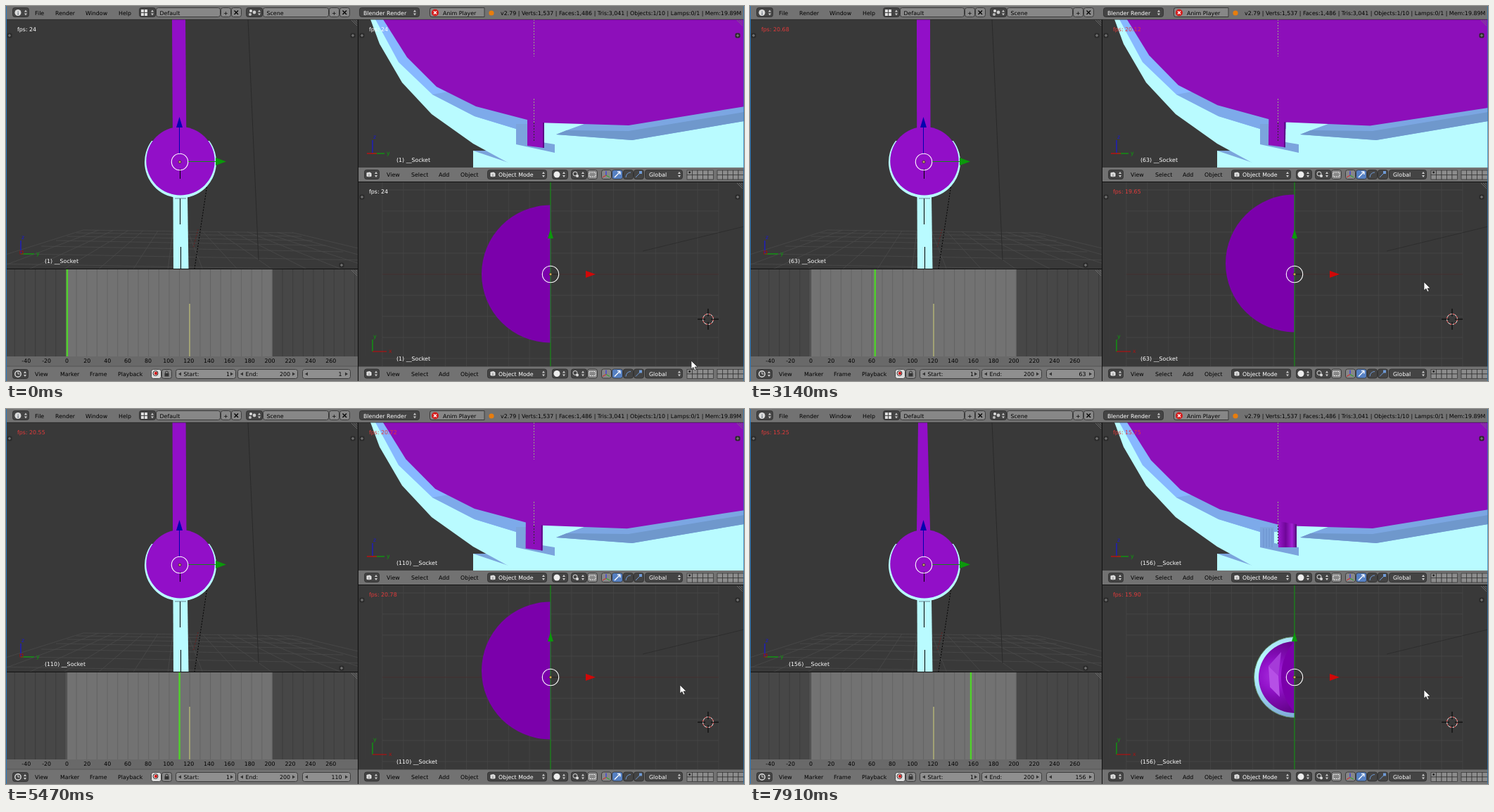
Animation, 1049 px wide and 534 px high, one loop 7990 ms. Source, as an HTML page:

```html
<!DOCTYPE html>
<html lang="en">
<head>
<meta charset="utf-8">
<title>Ball and socket</title>
<style>
html, body { margin: 0; width: 100%; height: 100%; overflow: hidden; background: #393939; }
svg { display: block; width: 1049px; height: 534px; }
text { font: 7.9px "DejaVu Sans", sans-serif; white-space: pre; }
</style>
</head>
<body>
<svg id="stage" viewBox="0 0 1049 534"></svg>
<script>
const stage = document.getElementById('stage');
const PURPLE = '#920fc8', CYAN = '#b9fbff', HEAD = '#727272', DARK = '#444', FIELD = '#878787', VIEW = '#393939';

// ---- markup helpers ----
const box = (x, y, w, h, fill, rx = 0, extra = '') =>
  `<rect x="${x}" y="${y}" width="${w}" height="${h}" fill="${fill}" rx="${rx}" ${extra}/>`;
const line = (x1, y1, x2, y2, color, w = 1, extra = '') =>
  `<path d="M${x1} ${y1}L${x2} ${y2}" stroke="${color}" stroke-width="${w}" fill="none" ${extra}/>`;
const poly = (pts, fill, extra = '') => `<polygon points="${pts}" fill="${fill}" ${extra}/>`;
const dot = (x, y, r, fill, extra = '') => `<circle cx="${x}" cy="${y}" r="${r}" fill="${fill}" ${extra}/>`;
const text = (x, y, s, fill = '#000', extra = '') => `<text x="${x}" y="${y}" fill="${fill}" ${extra}>${s}</text>`;
const ring = (x, y, r, color, w = 1, extra = '') => dot(x, y, r, 'none', `stroke="${color}" stroke-width="${w}" ${extra}`);
const button = (x, y, w, fill, h = 14) => box(x + .5, y + .5, w - 1, h - 1, fill, 3, 'stroke="#2c2c2c" stroke-width=".8"');
const repeat = (n, fn) => Array.from({ length: n }, (_, i) => fn(i)).join('');
const arrows = (x, y) => poly(`${x - 2},${y - 1} ${x + 2},${y - 1} ${x},${y - 4}`, '#ccc') +
  poly(`${x - 2},${y + 1} ${x + 2},${y + 1} ${x},${y + 4}`, '#ccc');
const cube = (x, y) => poly(`${x - 4},${y - 3} ${x + 1},${y - 4} ${x + 4},${y - 2} ${x + 4},${y + 3} ${x},${y + 4} ${x - 4},${y + 3}`, '#ddd', 'stroke="#222" stroke-width=".7"') +
  line(x, y - 1, x, y + 4, '#555', .7);
const plus = (x, y) => box(x - 3.5, y - 3.5, 7, 7, '#2b2b2b', 2) + line(x - 2, y, x + 2, y, '#888') + line(x, y - 2, x, y + 2, '#888');
const corner = (x, y) => repeat(3, i => line(x - 8 + i * 3, y, x, y + 8 - i * 3, '#777', .8));
const label = (id, x, y) => text(x, y, '', '#fff', `id="${id}"`);

function axes(x, y, up, upName, upColor, side, sideName, sideColor) {
  return line(x, y, x, y - up, upColor, 1.3) + text(x + 1, y - up - 2, upName, upColor) +
    line(x, y, x + side, y, sideColor, 1.3) + text(x + side + 3, y + 2, sideName, sideColor);
}

function topBar() {
  const names = [[41, 'File'], [70, 'Render'], [113, 'Window'], [160, 'Help']];
  const idField = (x, w, name) => button(x, 2, 24, DARK) + arrows(x + 19, 9.5) +
    button(x + 24, 2, w, FIELD) + text(x + 29.5, 12.5, name) +
    button(x + 24 + w, 2, 15, FIELD) + button(x + 39 + w, 2, 15, FIELD) +
    text(x + 28 + w, 13, '+', '#000') + line(x + 43.5 + w, 6.5, x + 49 + w, 12, '#000', 1.2) + line(x + 49 + w, 6.5, x + 43.5 + w, 12, '#000', 1.2);
  return box(0, 0, 1049, 19, HEAD) + button(9, 2, 24, DARK) + arrows(28, 9.5) +
    dot(17, 9.5, 4.5, '#ddd') + text(17, 12.5, 'i', '#234', 'text-anchor="middle" font-weight="bold"') +
    names.map(n => text(n[0], 12.5, n[1])).join('') +
    idField(189, 92, 'Default') + idField(341, 94, 'Scene') +
    repeat(4, i => box(192 + i % 2 * 5, 5 + (i >> 1) * 5, 4, 4, '#ddd')) +
    dot(348, 7, 2, '#ddd') + dot(353, 9, 2.4, '#ccc') + dot(347, 12, 2, '#bbb') +
    button(502, 2, 86, DARK) + text(508, 12.5, 'Blender Render', '#fff') + arrows(581, 9.5) +
    button(602, 2, 95 - 17, FIELD) + button(602, 2, 95, FIELD) + box(680, 1, 18, 17, HEAD) + line(680, 2.5, 680, 15.5, '#2c2c2c', .8) +
    dot(610, 9.5, 5, '#d31c1c') +
    line(608, 7.5, 612, 11.5, '#fff', 1.4) + line(612, 7.5, 608, 11.5, '#fff', 1.4) +
    text(621, 12.5, 'Anim Player') + dot(690, 10, 3.6, '#e87d0d') +
    text(703, 12.5, 'v2.79 | Verts:1,537 | Faces:1,486 | Tris:3,041 | Objects:1/10 | Lamps:0/1 | Mem:19.89M');
}

function viewBar(y) {
  const c = y + 10, names = [[541, 'View'], [576, 'Select'], [615, 'Add'], [646, 'Object']];
  const layers = x => repeat(10, i => box(x + i % 5 * 7.5, y + 4 + (i / 5 | 0) * 6.5, 7.5, 6.5, '#8c8c8c', 0, 'stroke="#333" stroke-width=".7"'));
  return box(501, y, 548, 20.5, HEAD) + button(509, c - 7, 22, DARK) + cube(516, c) + arrows(526, c) +
    names.map(n => text(n[0], c + 3, n[1])).join('') +
    button(684, c - 7, 85, DARK) + cube(692, c) + text(700, c + 3, 'Object Mode', '#fff') + arrows(764, c) +
    button(776, c - 7, 23, DARK) + dot(783, c, 4.5, '#eee') + arrows(793, c) +
    button(803, c - 7, 23, DARK) + ring(809, c - 1, 3, '#ddd') + dot(812, c + 2, 2, '#ddd') + arrows(820, c) +
    button(826, c - 7, 15, FIELD) + box(829, c - 3, 9, 6, 'none', 0, 'stroke="#eee" stroke-dasharray="2 1"') +
    button(846, c - 7, 15, FIELD) + line(853, c + 1, 853, c - 5, '#22f') + line(853, c + 1, 858, c + 4, '#2a2') + line(853, c + 1, 848, c + 4, '#d22') +
    button(861, c - 7, 16, '#5680c2') + line(865, c + 4, 873, c - 4, '#fff', 1.3) + line(869, c - 4, 873, c - 4, '#fff', 1.3) + line(873, c - 4, 873, c, '#fff', 1.3) +
    button(877, c - 7, 15, DARK) + `<path d="M881 ${c + 4}Q882 ${c - 3} 888 ${c - 3}" stroke="#6f9ad6" fill="none"/>` +
    button(892, c - 7, 15, DARK) + line(895, c + 4, 902, c - 3, '#6f9ad6') + box(900, c - 5, 4, 4, '#6f9ad6') +
    button(908, c - 7, 54, DARK) + text(914, c + 3, 'Global', '#fff') + arrows(957, c) + layers(968) + layers(1011) +
    dot(971.7, c - 3, 1.4, '#222');
}

// Perspective view of the joint
function leftView() {
  const grid = repeat(15, i => line(110 + i * 21.2, 319 + i * .25, -70 + i * 50, 376, '#4b4b4b', .8)) +
    [319, 323, 328, 334, 342, 353, 367].map((y, i) => line(110 - (y - 319) * 2.6, y, 408 + (y - 319) * 3.1, y + 4 + i, '#4b4b4b', .8)).join('');
  return `<g clip-path="url(#clipL)">` + box(1, 19, 499, 356, VIEW) + grid +
    line(344, 19, 359, 362, '#2a2a2a') + line(286, 254, 268, 374, '#000', 1, 'stroke-dasharray="2 2"') +
    line(273, 318, 266, 345, '#6b1d1d', 1, 'stroke-dasharray="2 2"') +
    poly('237.5,272 258,272 259.5,375 238,375', CYAN) +
    `<path d="M207 192A51 51 0 1 0 289 192Z" fill="${CYAN}"/>` +
    line(247.5, 274, 247.5, 311, '#000') + line(248.5, 343, 248.5, 374, '#000') +
    poly('', PURPLE, 'id="rod"') + dot(248, 220.7, 48.7, PURPLE) +
    line(240, 274, 256, 274, '#567', .8) +
    line(247.5, 232, 247.5, 246, '#000') + line(246.5, 210, 246.5, 172, '#0000b0') + poly('246.5,158 242,173 251,173', '#0404ae') +
    line(259, 221.5, 299, 221.5, '#158a15') + poly('298,216 298,227 313,221.5', '#0b980b') +
    ring(247, 222, 11.7, '#fff', 1.1) + dot(247, 222, 2, '#c99a72', 'stroke="#222" stroke-width=".7"') +
    axes(21, 353, 19, 'z', '#1a1ad0', 19, 'y', '#0ba00b') + box(20, 349, 4, 4, 'none', 0, 'stroke="#a01010"') +
    plus(5, 42) + plus(493, 42) + plus(477, 369) + label('fpsL', 16, 35.5) + label('nameL', 55, 366.3) + '</g>';
}

// Close-up of the slot
function closeView() {
  const dots = 'stroke-dasharray="2 2"';
  return `<g clip-path="url(#clipT)">` + box(501, 19, 548, 211, VIEW) +
    poly('664,206 683,206 740,231 664,231', CYAN) + poly('664,206 683,206 735,230', '#7ba4dc') +
    poly('518,19 531,54 563,109 605,154 664,196 728,231 1049,231 1049,19', CYAN) +
    poly('525,19 558,80 606,126 666,157 725,175 760,175 668,130 560,19', '#87b8ff') +
    poly('606,126 666,157 725,175 762,175 762,150 640,120', '#7daaea') +
    poly('725,168 745,168 745,191 780,197 780,209 725,197', '#7ba4dd') +
    `<g id="stripes">` + repeat(4, i => line(730 + i * 4, 170, 730 + i * 4, 197, '#6288c4', .8)) + '</g>' +
    poly('797,177 830,165 885,158 1049,135 1049,164 890,191 782,183', '#7ba6e2') +
    poly('782,183 797,177 885,178 1049,151 1049,164 890,191', '#6f98cc') +
    `<g id="body">` + poly('480,-90 512,-25 536,19 570,73 612,115 668,143 756,166 885,170 1062,141 1150,110 1150,-90', '#8d0fba') +
    poly('', 'url(#pinFill)', 'id="pin"') + poly('', '#5b0787', 'id="pinEdge"') + '</g>' +
    line(750.5, 19, 750.5, 72, '#9aa884', 1, dots) + line(750.5, 132, 750.5, 166, '#9aa884', 1, dots) +
    line(750.5, 166, 750.5, 192, '#2c2c2c', 1, dots) +
    axes(521, 210, 19, 'z', '#1a1ad0', 17, 'y', '#0ba00b') + line(513, 210, 527, 210, '#b01515', 1.6) +
    plus(506, 42) + plus(1040, 42) + label('fpsT', 516, 35.5) + label('nameT', 555, 222) + '</g>';
}

// View from above
function planView() {
  return `<g clip-path="url(#clipB)">` + box(501, 251, 548, 262, VIEW) +
    repeat(17, i => line(535 + i * 29.87, 251, 535 + i * 29.87, 513, '#474747', .8)) +
    repeat(9, i => line(535, 262 + i * 30, 1013, 262 + i * 30, i === 4 ? '#472b2b' : '#474747', .8)) +
    line(905, 349, 1049, 314, '#2b2b2b', .8) +
    `<g clip-path="url(#clipHalf)">` + dot(774, 382, 57.5, 'url(#rim)', 'stroke="#5c8f58" stroke-width=".8"') + dot(774, 382, 51, 'url(#bowl)') +
    poly('737,366 755,346 751,380', '#a53bd8') + poly('737,366 751,380 753,410 739,396', '#b650e6') +
    dot(774, 382, 98, '#7b00ab', 'id="disc"') + '</g>' +
    line(774, 251, 774, 513, '#0d970d') + line(774, 382, 786, 382, '#222') +
    poly('774,318 770,331 778,331', '#0b980b') + poly('824,377 824,387 838,382', '#d00808') +
    ring(774, 382, 11.7, '#fff', 1.1) + dot(774, 382, 2, '#c9a852', 'stroke="#222" stroke-width=".7"') +
    ring(998, 446, 7.5, '#fff') + ring(998, 446, 7.5, '#d02020', 1, 'stroke-dasharray="3 3"') +
    [[983, 446, 994, 446], [1002, 446, 1013, 446], [998, 431, 998, 442], [998, 450, 998, 461]].map(l => line(...l, '#000')).join('') +
    axes(521, 492, 17, 'y', '#0ba00b', 20, 'x', '#a81313') +
    plus(506, 272) + plus(1040, 272) + label('fpsB', 516, 266.8) + label('nameB', 555, 505.3) + '</g>';
}

const frameX = f => 85.5 + f * 1.4645;

function timeline() {
  const number = (x, w, name) => button(x, 517, w, '#8f8f8f') + poly(`${x + 4},524 ${x + 8},521.5 ${x + 8},526.5`, '#333') +
    poly(`${x + w - 4},524 ${x + w - 8},521.5 ${x + w - 8},526.5`, '#333') + text(x + 11.5, 526.8, name);
  const names = [[41, 'View'], [77, 'Marker'], [119, 'Frame'], [159, 'Playback']];
  return box(1, 375, 499, 124, '#474747') + box(87, 375, 291.5, 124, HEAD) +
    repeat(35, i => {
      const x = frameX((i - 5) * 10), inside = i > 4 && i < 26;
      return line(x, 375, x, 499, inside ? '#636363' : '#3c3c3c', .9);
    }) +
    line(261, 424, 261, 499, '#c6c67c', 1.2) + line(0, 375, 0, 499, '#50d22b', 2.4, 'id="playhead"') +
    box(1, 499, 499, 14, '#696969') +
    repeat(16, i => text(86.5 + (i * 20 - 40) * 1.443, 508.3, i * 20 - 40, '#000', 'text-anchor="middle"')) +
    box(1, 513, 499, 21, HEAD) + line(1, 513, 500, 513, '#555') + button(9, 517, 23, DARK) + ring(17, 524, 4.2, '#ddd', 1.4) +
    line(17, 521, 17, 524, '#ddd') + line(17, 524, 19.5, 524, '#ddd') + arrows(27, 524) +
    names.map(n => text(n[0], 526.8, n[1])).join('') +
    button(206, 517, 15, '#ddd') + ring(212.5, 523, 3.5, '#333') + dot(213, 523, 2.2, '#d31c1c') +
    button(221, 517, 15, FIELD) + box(225.5, 523, 6, 4.5, '#333') + ring(228.5, 522, 2, '#333', 1) +
    number(241, 86, 'Start:') + text(318, 526.8, 1, '#000', 'text-anchor="end"') +
    number(329, 86, 'End:') + text(404, 526.8, 200, '#000', 'text-anchor="end"') +
    number(421, 69, '') + text(477.5, 526.8, '', '#000', 'text-anchor="end" id="counter"');
}

const clip = (id, x, y, w, h) => `<clipPath id="${id}">${box(x, y, w, h, '#000')}</clipPath>`;
const stops = list => list.map(([o, c]) => `<stop offset="${o}" stop-color="${c}"/>`).join('');

stage.innerHTML = '<defs>' + clip('clipL', 1, 19, 499, 355) + clip('clipT', 501, 19, 548, 211) + clip('clipB', 501, 251, 548, 262) +
  clip('clipHalf', 600, 251, 174, 262) +
  `<linearGradient id="rim" x1="0" y1="0" x2="0" y2="1">${stops([[0, '#a9def5'], [.3, CYAN], [.6, '#a8e4fa'], [1, '#7fa9d8']])}</linearGradient>` +
  `<radialGradient id="bowl" gradientUnits="userSpaceOnUse" cx="744" cy="380" r="52">${stops([[0, '#a62bdc'], [.35, '#9414cc'], [.6, '#800bb2'], [1, '#68048f']])}</radialGradient>` +
  `<linearGradient id="pinFill">${stops([0, .4, .75, 1].map(o => [o, '#8d0fba']))}</linearGradient></defs>` +
  leftView() + closeView() + planView() + timeline() + topBar() + viewBar(230) + viewBar(513.5) +
  line(500.5, 19, 500.5, 534, '#111') + line(0, 374.5, 500, 374.5, '#111') + line(501, 250.5, 1049, 250.5, '#111') +
  line(0, 19.3, 1049, 19.3, '#222', .6) +
  [[499, 20], [1047, 20], [1047, 252], [499, 376]].map(p => corner(...p)).join('') +
  line(.5, 0, .5, 534, '#2b79bd') + line(1048.6, 0, 1048.6, 534, '#2b79bd', .8) +
  `<path id="mouse" d="M0 0V12L3 9.5L5 14L7 13L5 9H9Z" fill="#fff" stroke="#222" stroke-width=".7"/>`;

// ---- motion ----
const el = {};
stage.querySelectorAll('[id]').forEach(e => el[e.id] = e);
const set = (id, attrs) => { for (const k in attrs) el[id].setAttribute(k, attrs[k]); };
const clamp = v => Math.max(0, Math.min(1, v));
const smooth = v => (v = clamp(v), v * v * (3 - 2 * v));

// Piecewise curve over [position, value] keys
function curve(keys, p, ease = clamp) {
  let i = 0;
  while (i < keys.length - 2 && p >= keys[i + 1][0]) i++;
  const [[a, va], [b, vb]] = [keys[i], keys[i + 1]];
  return va + (vb - va) * ease((p - a) / (b - a));
}

// Redraws come in bursts: [first, last, count]
const bursts = [[0, 0, 1], [100, 870, 11], [960, 1730, 11], [1800, 2570, 11], [2650, 3440, 11], [3510, 4290, 11],
  [4370, 5150, 11], [5230, 6010, 11], [6090, 6880, 11], [6960, 7670, 10], [7770, 7910, 3]];
function stepTime(t) {
  const [a, b, n] = bursts.filter(g => g[0] <= t).pop();
  if (n < 2) return a;
  const gap = (b - a) / (n - 1);
  return a + gap * Math.min(n - 1, Math.floor((t + 6 - a) / gap));
}

const times = [0, 1114, 3124, 4682, 5464, 6880, 7910];
const track = values => values.map((v, i) => [times[i], v]);
const frames = track([1, 22, 63, 94, 110, 139, 156]);
const rates = {
  L: track([21, 21.15, 20.68, 19.10, 20.55, 21.86, 15.25]),
  T: track([20.9, 20.36, 20.12, 19.36, 20.72, 21.61, 15.75]),
  B: track([20.5, 19.89, 19.65, 20.06, 20.78, 21.15, 15.90])
};
const swing = [[1, 0], [25, 35], [90, -45], [118, 0]];

function draw(t) {
  const now = stepTime(t), f = Math.round(curve(frames, now));
  const off = curve(swing, f, smooth), u = Math.max(0, f - 120), k = u / 36;

  const cx = 245.5 - off * .065, foot = 246.6 - off * .02, half = (19 - 6 * k ** 1.7) / 2;
  set('rod', { points: `${cx - half},18 ${cx + half},18 ${foot + 9.7},180 ${foot - 9.7},180` });

  const turn = -off * .04;
  set('body', { transform: `rotate(${turn} 830 -187)` });
  const l = 741 + 10 * k, r = 765 + 12 * k, low = 202 - 5 * k;
  set('pin', { points: `${l},160 ${r},164 ${r},${low} ${l},${low - 3 * (1 - k)}` });
  set('pinEdge', { points: `${r - 2},166 ${r},166 ${r},${low} ${r - 2},${low}` });
  const shades = u ? ['#9a18cc', '#6f0699', '#a321d4', '#560680'] : Array(4).fill('#8d0fba');
  el.pinFill.querySelectorAll('stop').forEach((s, i) => s.setAttribute('stop-color', shades[i]));
  set('stripes', { opacity: u ? .8 : 0 });

  const radius = 98 - 20 * clamp((u - 19) / 17);
  set('disc', { cx: 676 + u * 1.671 + u * u * .0145 + radius, cy: 381.5 + off, r: radius });

  set('playhead', { d: `M${frameX(f)} 375V499` });
  el.counter.textContent = f;
  for (const v of 'LTB') {
    el['name' + v].textContent = `(${f}) __Socket`;
    el['fps' + v].textContent = 'fps: ' + (now ? curve(rates[v], now).toFixed(2) : 24);
    set('fps' + v, { fill: now ? '#e23a3a' : '#fff' });
  }

  const go = smooth((now - 50) / 600), drop = 7 * clamp((now - 7690) / 220);
  set('mouse', { transform: `translate(${974 - 16 * go} ${505 - 112 * go + drop})` });
}

function tick() {
  draw(performance.now() % 7990);
  requestAnimationFrame(tick);
}
tick();
</script>
</body>
</html>
```
